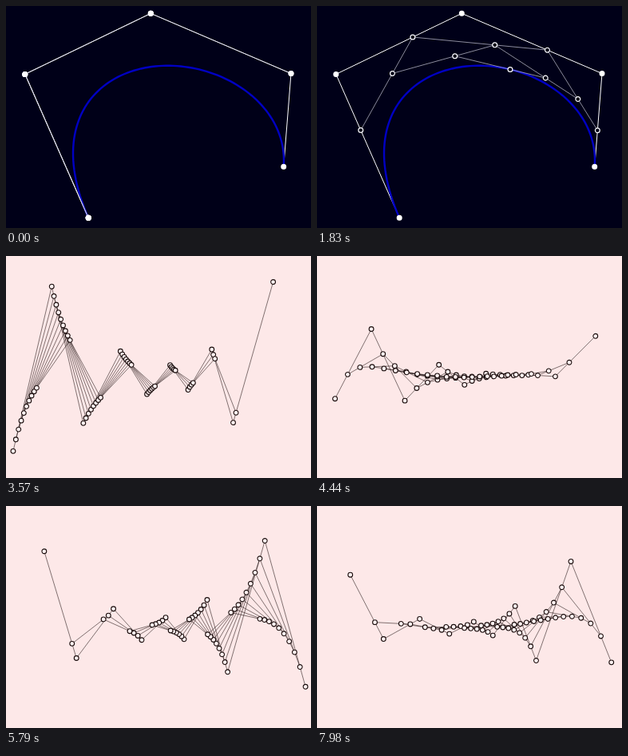
Recreate the animation shown at these times as an HTML page. Size 382 by 278 pixels, loop 8000 ms.

```html
<!DOCTYPE html>
<html lang="en">
<head>
<meta charset="utf-8">
<title>De Casteljau curves</title>
<style>
  html, body { margin: 0; width: 100%; height: 100%; overflow: hidden; background: #000018; }
  svg { display: block; width: 100%; height: 100%; }
  path { fill: none; }
  .night { background: #000018; }
  .night .frame { stroke: #fff; stroke-width: 1; }
  .night .curve { stroke: #0000c3; stroke-width: 2.4; }
  .night .line { stroke: #d8d8e4; stroke-width: .65; }
  .night .ring { fill: #000018; stroke: #fff; stroke-width: 1.2; }
  .night .dots { fill: #fff; }
  .rose { background: #fde8e8; }
  .rose .line { stroke: #180c0c; stroke-width: .55; }
  .rose .ring { fill: #fff0f0; stroke: #180c0c; stroke-width: 1.1; }
</style>
</head>
<body>
<svg id="stage" viewBox="0 0 382 278">
  <g id="night"></g>
  <g id="rose"></g>
</svg>
<script>
const LOOP = 8000, STEP = 30, CUT = 2970;
const ARCH = [[103.2, 265.3], [23.8, 85.4], [181.3, 9.3], [357, 84.5], [347.7, 201.3]];
const ZIGZAG = [
  [5.5, 261], [54.5, 24.7], [93.5, 216.5], [141, 115], [174.5, 176], [204, 134],
  [226, 172], [256, 109], [281, 223.3], [331, 15.3], [382, 259.4]
];

const stage = document.getElementById('stage');
const night = document.getElementById('night');
const rose = document.getElementById('rose');

function addPath(parent, cls, d = '') {
  const p = document.createElementNS('http://www.w3.org/2000/svg', 'path');
  p.setAttribute('class', cls);
  p.setAttribute('d', d);
  parent.appendChild(p);
  return p;
}

const polyline = pts => 'M' + pts.map(p => p[0].toFixed(2) + ' ' + p[1].toFixed(2)).join('L');

const circles = (pts, r) => pts.map(([x, y]) =>
  `M${(x - r).toFixed(2)} ${y.toFixed(2)}a${r} ${r} 0 1 0 ${2 * r} 0a${r} ${r} 0 1 0 ${-2 * r} 0z`).join('');

// All interpolation levels below the control polygon, ending in the curve point.
function levels(pts, t) {
  const out = [];
  while (pts.length > 1) {
    pts = pts.slice(1).map((q, i) => q.map((v, k) => pts[i][k] + (v - pts[i][k]) * t));
    out.push(pts);
  }
  return out;
}

function makeRig(group, points) {
  const count = points.length - 1;
  const make = cls => Array.from({ length: count }, () => addPath(group, cls));
  const lines = make('line'), rings = make('ring');
  return t => levels(points, t).forEach((pts, i) => {
    lines[i].setAttribute('d', polyline(pts));
    rings[i].setAttribute('d', circles(pts, 2.9));
  });
}

const curve = Array.from({ length: 101 }, (_, i) => levels(ARCH, i / 100).pop()[0]);
addPath(night, 'frame', polyline(ARCH));
addPath(night, 'curve', polyline(curve));
const drawArch = makeRig(night, ARCH);
addPath(night, 'dots', circles(ARCH, 3.5));
const drawZigzag = makeRig(rose, ZIGZAG);

function render(ms) {
  const time = Math.floor(ms / STEP) * STEP;
  const first = time < CUT;
  night.style.display = first ? '' : 'none';
  rose.style.display = first ? 'none' : '';
  stage.setAttribute('class', first ? 'night' : 'rose');
  if (first) drawArch(time / 3000);
  else drawZigzag((1 - Math.cos((time - 2925) / 1200)) / 2);
}

const start = performance.now();
function tick() {
  render((performance.now() - start) % LOOP);
  requestAnimationFrame(tick);
}
tick();
</script>
</body>
</html>
```
